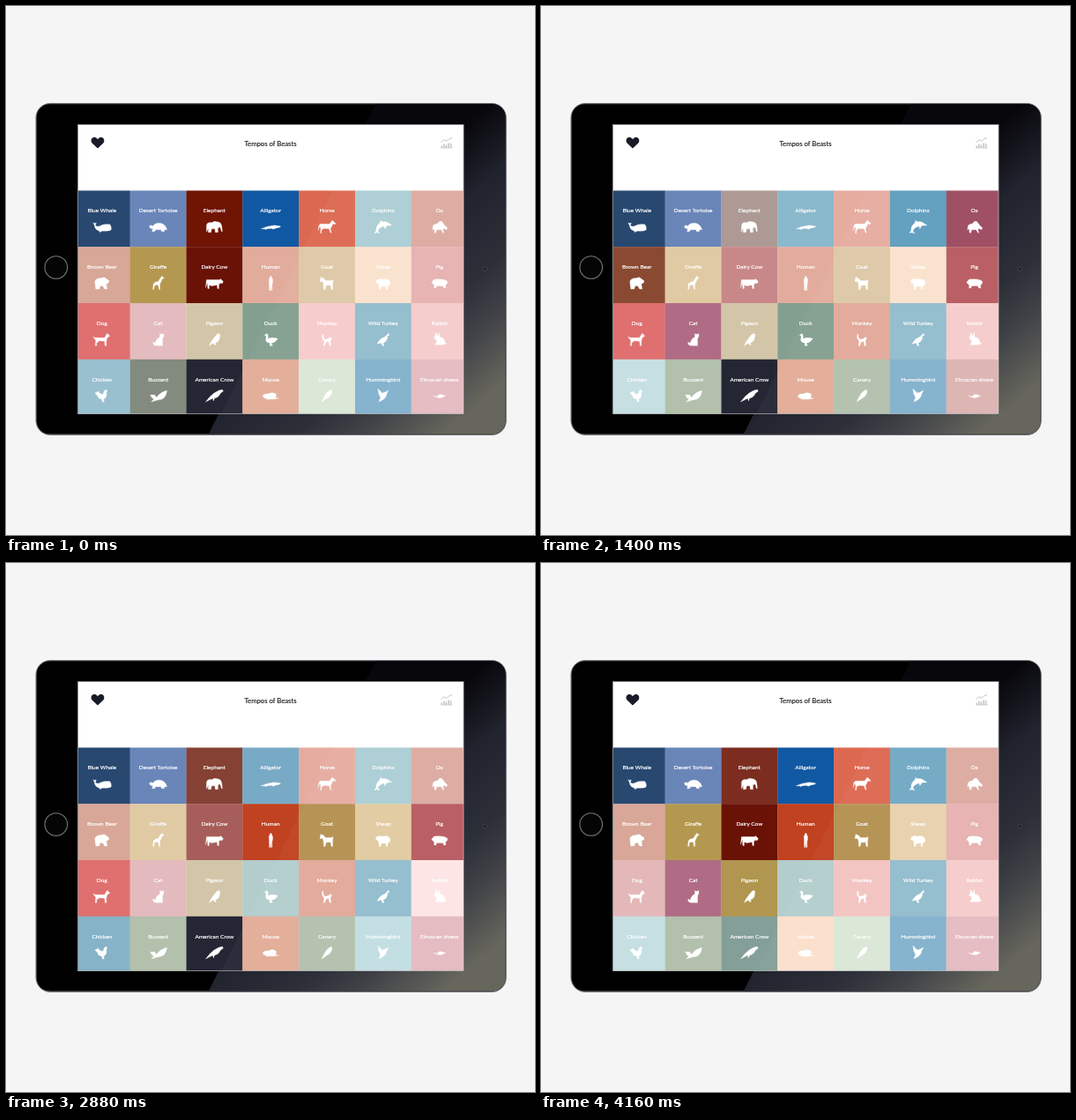
Recreate the animation shown at these times as an HTML page. Size 600x600 px, loop 4200 ms.

```html
<!DOCTYPE html>
<html lang="en">
<head>
<meta charset="utf-8">
<title>Tempos of Beasts</title>
<style>
  html, body { margin: 0; width: 100%; height: 100%; overflow: hidden; background: #f5f5f5; }
  svg { display: block; width: 100%; height: 100%; }
  text { font-family: Lato, "Open Sans", sans-serif; text-anchor: middle; }
  .title { font-size: 7.7px; fill: #111; stroke: #111; stroke-width: .12; }
  .label { font-size: 6.5px; fill: #fff; stroke: #fff; stroke-width: .18; }
  .animal { fill: #fff; stroke: #fff; stroke-width: .3; stroke-linejoin: round; }
</style>
</head>
<body>
<svg viewBox="0 0 600 600">
  <defs>
    <linearGradient id="sheen" gradientUnits="userSpaceOnUse" x1="250" y1="110" x2="570" y2="480">
      <stop offset=".4" stop-color="#08080c"/>
      <stop offset=".53" stop-color="#20222d"/>
      <stop offset=".68" stop-color="#2c2e38"/>
      <stop offset=".78" stop-color="#404247"/>
      <stop offset=".91" stop-color="#66665c"/>
    </linearGradient>
    <clipPath id="body"><rect x="34.7" y="111.2" width="531.8" height="374.4" rx="15"/></clipPath>
    <clipPath id="screen"><rect x="82" y="135" width="436.7" height="327.3"/></clipPath>
  </defs>

  <rect x="33.5" y="110" width="534.3" height="377" rx="17" fill="#73747b"/>
  <g clip-path="url(#body)">
    <rect x="34" y="111" width="533" height="375" fill="#000"/>
    <path d="M420 110L229 487H568V110Z" fill="url(#sheen)"/>
  </g>
  <circle cx="56.8" cy="296.5" r="12.8" fill="#050505" stroke="#76777c" stroke-width="1.1"/>
  <circle cx="543" cy="298.5" r="2.2" fill="#1c1e28" stroke="#50525e" stroke-width=".7"/>

  <rect x="81" y="134" width="438.5" height="329" fill="#85858b"/>
  <rect x="82" y="135" width="436.7" height="327.3" fill="#fff"/>
  <path d="M104 161.5L97.6 155.4C94.8 152 98.5 147.2 102.2 149.4Q103.4 150 104 151.2Q104.6 150 105.8 149.4C109.5 147.2 113.2 152 110.4 155.4Z" fill="#191b27"/>
  <text class="title" x="300" y="159.4">Tempos of Beasts</text>
  <g fill="none" stroke="#c3c8c4">
    <path d="M493.5 154.5L497 151.8L500 153.2L503 150.5L506 149.5" stroke-width="1"/>
    <path d="M494.2 161V158.5M496.8 161V156.5M499.4 161V157.5M502 161V155.5M504.6 161V156" stroke-width="1.6"/>
    <path d="M493 161H506.5" stroke-width=".8"/>
  </g>

  <g clip-path="url(#screen)">
    <g id="grid"></g>
    <path d="M370 209L244 463H520V209Z" fill="#fff" opacity=".03"/>
  </g>
</svg>

<script>
const LOOP = 4200, CELL = 63.8, LEFT = 76.9, TOP = 209.4;

// name, silhouette, rest colour, beat colour, beats per loop,
// [start, rise, hold, fall] in ms, optional colour halfway through rise and fall
const animals = [
  ["Blue Whale", "M-10-5L-8-4L-7-5L-6.5-4L-7.5-2Q-6 0-3-1Q2-4 9-3Q11-1 10.5 3Q9 4.5 5 4.5H0L-2 6L-3 4.5Q-8 3-8.5-2Z", "#284870"],
  ["Desert Tortoise", "M-10-1Q-8-3-6-1Q-4-5 2-4.5Q8-4 10 3H7V5H4L3 3H-3L-4 5H-7L-6 2Q-10 2-10-1Z", "#6a85b8"],
  ["Elephant", "M-9 5V-2Q-8-6-3-5Q0-7 3-6Q8-6 8.5 0L9 5H8L6.5 0L4 1V6H1L.5 2H-3L-4 6H-7V1L-8.5 5Z", "#ad9a94", "#701404", 2, [1980, 100, 580, 660]],
  ["Alligator", "M-11 2L-4-.5L4-2L11-1V0L5 1.5L3 2.5L1 1.5L-4 2L-6 3L-7 2Z", "#8ab8cc", "#1158a2", 2, [1960, 80, 620, 260]],
  ["Horse", "M-10 4L-9-2Q-8-4-4-3.5H3L6-7.5L7-7L10-4L9-3L7-4L5 0L4 2L5 6.5H4L2.5 2L-3 1.5L-6 3L-6.5 7H-7.5L-7 2L-8-1Z", "#e6aca0", "#dc6850", 2, [1960, 80, 420, 400], "#f08c8c"],
  ["Dolphins", "M10-2L7-4Q3-7-1-6L-3-7.5L-3.5-5Q-8-2-8 4L-10 7L-7 6L-4 7.5L-6 4Q-4 0 1-1L2 2L4-1.5Q7-2 10-2Z", "#aacdd4", "#5f9dbe", 2, [1000, 150, 900, 50]],
  ["Ox", "M-8 3L-7-2Q-4-4-2-4Q0-8 3-6L6-2L9 1L8 3L5 1.5L4 3L5 6.5H4L2 3H-3L-4 6.5H-5.5L-6 2Z", "#dcaaa0", "#9c4a60", 2, [1150, 150, 300, 400]],

  ["Brown Bear", "M-8-2Q-7-6 0-6Q3-8 5-5L8-3V-1L5 1L6 6.5H3L1 3H-2L-3 6.5H-7Z", "#d8a798", "#8a4a32", 4, [180, 140, 175, 70]],
  ["Giraffe", "M-6 7L-5.5 1Q-4-2 0-2L4-8L7-6L5-5.5L2 1V7H1L0 2H-4L-5 7Z", "#e0caa4", "#b59850", 4, [940, 60, 315, 35]],
  ["Dairy Cow", "M-10 5L-9-4H6L7-5L10-2L9 0H6L5 2V6H3.5L3 2L-3 3L-6 2V6H-7.5L-8-1Z", "#c88788", "#6a1206", 4, [700, 230, 150, 200]],
  ["Human", "M0-8Q1.5-8 1.3-6L2.3-4.5L2.2 0L1.6 1V8H.4L0 2L-.6 8H-1.6L-1.7-1L-2-4.5L-1-6Q-1.5-8 0-8Z", "#e2ac9c", "#c04220", 4, [660, 100, 260, 28]],
  ["Goat", "M-7-7L-3-5L-2-3H5L7-4L6.5 1V7H5L4 2L-1 2.5L-2 7H-3.5L-4 0L-5-2H-8Z", "#ddc8a6", "#b49050", 4, [490, 140, 390, 28], "#e1ab9c"],
  ["Sheep", "M-8-3Q-6-6-1-4.5Q7-6 8-1Q8 3 5 3V7H3.5L3 3.5H-2L-3 7H-4.5L-5 2L-6 0L-8.5-1Z", "#fae2cc", "#e0caa0", 7, [400, 60, 90, 40]],
  ["Pig", "M-9-1L-6-4.5Q6-5.5 9-2V0L7 2V5.5H5L4 3H-3L-4 5.5H-6V2Z", "#e6b0b0", "#b85a60", 4, [60, 120, 700, 110]],

  ["Dog", "M-10-3L-7-2H3L6-7L9-4L6-2L5 2V7H3.5L3 2L-3 1.5L-6 4V7H-7.5L-7 1Z", "#e4b8b8", "#e07070", 6, [670, 30, 570, 80]],
  ["Cat", "M2-7L3-6H5L6-7L6.5-4L5-1V7H-2Q-6 7-6 3H-5Q-4 5-3 3Q-2-1 2-3Z", "#e4bbbe", "#b06c84", 8, [255, 60, 180, 30]],
  ["Pigeon", "M5-7Q7-6 6-3Q6 2 1 4L2 6H0L-1 4L-6 7L-4 3Q0-3 3-6Z", "#d3c6a8", "#b0964e", 12, [230, 40, 45, 30]],
  ["Duck", "M-7-4.5L-5-6.5Q-3-7-3-4V-1Q2-3 8-1Q5 4 1 4V6H2V7H-1V4Q-6 3-5.5 0L-5-4Z", "#b3cccc", "#839f8f", 7, [575, 25, 240, 60]],
  ["Monkey", "M-5-6Q-7-2-3 2L-4 7H-2.5L-1 3L2 2L3 7H4.5L4 1L5.5-1L4-3L2-1L-2 0Q-5-2-4-6Z", "#f6cacb", "#e2a898", 8, [150, 80, 220, 45]],
  ["Wild Turkey", "M6-7L7-5L5-4Q5 2 0 4L1 7H-1L-2 4L-7 5Q-3-2 2-3Z", "#92bccc", "#428890", 12, [160, 40, 20, 40]],
  ["Rabbit", "M-4-8L-2-4L0-8V-3Q6-2 6 3L8 4L5 6H-5L-3 3L-4 0L-6-1L-5-4Z", "#f6cbcb", "#fde4e4", 8, [180, 50, 50, 60]],

  ["Chicken", "M-8-3L-4-5Q-3-2 1-1.5L3-6L5-7L6-5L5-4Q6 2 2 4L2.5 7H.5L0 4Q-5 3-5 0Z", "#c6dfe2", "#86b3c7", 19, [208, 20, 10, 40]],
  ["Buzzard", "M-9-1H-4L-2 2Q2-4 10-6Q9 2 4 4L-1 5L-8 7L-5 4Q-8 2-9-1Z", "#b2c0ac", "#646860", 16, [260.5, 5, 37, 40]],
  ["American Crow", "M9-7L10-5L7-3Q5 2 0 3L-1 6L-2 3L-10 7L-5 1Q0-4 5-6Z", "#839f97", "#242634", 12, [320, 30, 85, 45]],
  ["Mouse", "M-9 0Q-6-3-3-2Q2-5 6-2Q7 1 5 2L9 3L3 4H-4L-8 2Z", "#e2ac98", "#fbdfcc", 12, [270, 30, 15, 30]],
  ["Canary", "M5-7L6-5Q5 1 0 3L-6 7L-3 1Q0-5 5-7Z", "#dae6d6", "#b2c0ac", 14, [110, 50, 50, 40]],
  ["Hummingbird", "M-6-8L-1-3L2-4L6-6L4-2Q3 3-1 5L-5 7L-3 2L-5-2Z", "#c2dee2", "#82b1cb", 12, [215, 40, 100, 40]],
  ["Etruscan shrew", "M-7 0L-3 1Q0-3 3-1L7 0L4 1.5Q1 3-2 2L-4 1.5Z", "#e4bbc0", "#dcb4b2", 14, [180, 10, 20, 10]]
];

const grid = document.getElementById("grid");

function add(tag, attrs) {
  const el = document.createElementNS("http://www.w3.org/2000/svg", tag);
  for (const key in attrs) el.setAttribute(key, attrs[key]);
  return grid.appendChild(el);
}

function beat(tile, rest, hot, beats, [start, rise, hold, fall], mid) {
  const period = LOOP / beats;
  const frames = [];
  const key = (ms, fill) => frames.push({ fill, offset: Math.min(1, ms / period) });
  const down = rise + hold;
  key(0, rest);
  if (mid) key(rise / 2, mid);
  key(rise, hot);
  key(down, hot);
  if (mid) key(down + fall / 2, mid);
  key(down + fall, rest);
  key(period, rest);
  tile.animate(frames, { duration: period, delay: start - period, iterations: Infinity });
}

animals.forEach(([name, shape, rest, hot, ...pulse], i) => {
  const x = LEFT + CELL * (i % 7), y = TOP + CELL * Math.floor(i / 7);
  const mid = x + CELL / 2;
  const tile = add("rect", { x, y, width: CELL + .2, height: CELL + .2, fill: rest });
  add("text", { class: "label", x: mid, y: y + 24.9 }).textContent = name;
  add("path", { class: "animal", d: shape, transform: `translate(${mid} ${y + 41.3})` });
  if (hot) beat(tile, rest, hot, ...pulse);
});
</script>
</body>
</html>
```
